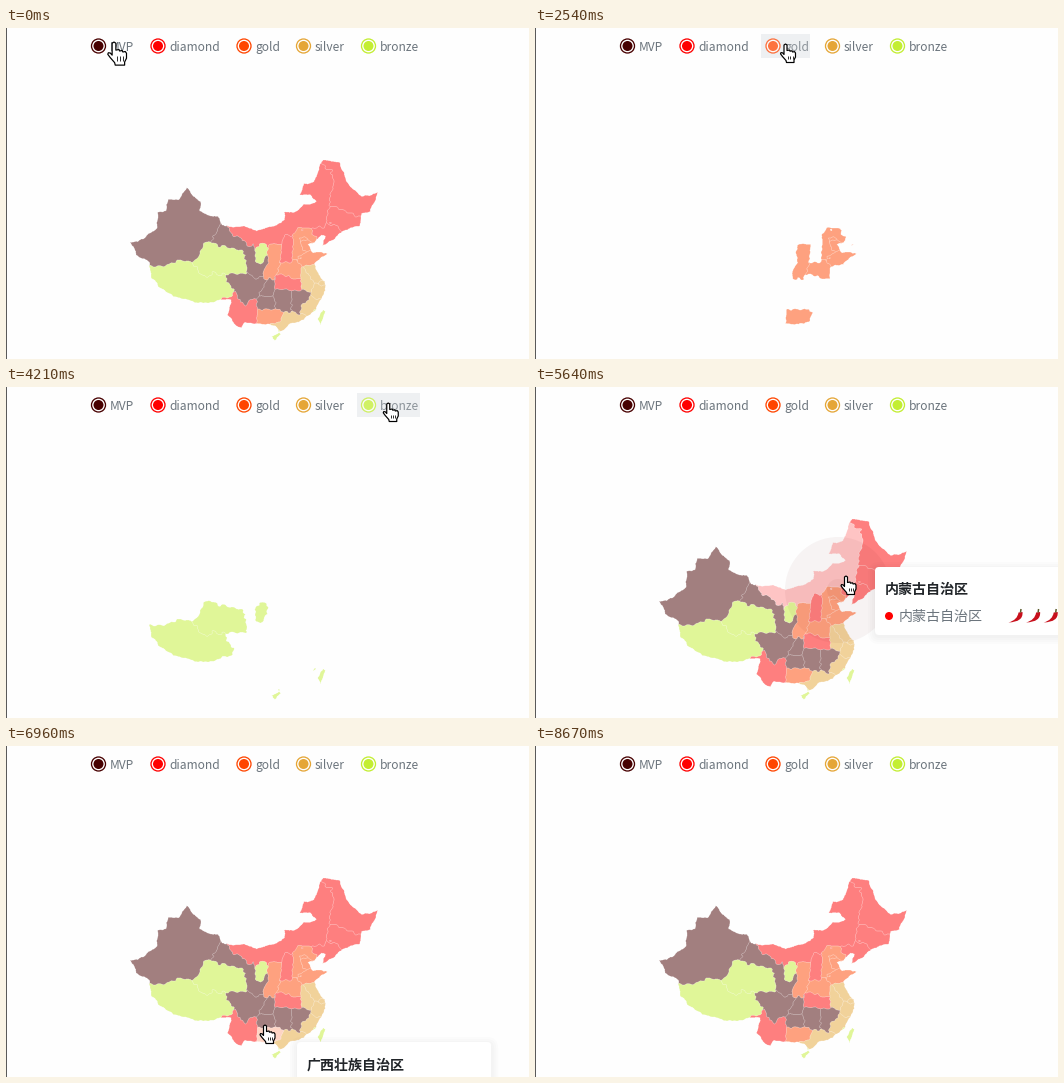
A matplotlib script for the animation above (9850 ms loop, 523 by 331 pixels).

```python
import numpy as np
import matplotlib.pyplot as plt
from matplotlib.animation import FuncAnimation
from matplotlib.patches import Circle, FancyBboxPatch, PathPatch, Polygon, Rectangle
from matplotlib.path import Path

W, H, STEP, LOOP = 523, 331, 50, 9850
FADE, LAG, SAMPLES = 250, 200, 3
plt.rcParams["font.family"] = ["Noto Sans CJK JP", "DejaVu Sans"]
BG = np.array([254, 254, 254]) / 255
GREY, INK = "#6c757d", "#212529"

# label, colour, icon x, right edge of the hover box, focus start and end
TIERS = [
    ("MVP", (71, 0, 0), 92.5, 131, 560, 1100),
    ("diamond", (255, 0, 0), 152, 216, 1150, 1910),
    ("gold", (255, 69, 0), 238, 275, 2240, 2910),
    ("silver", (229, 166, 55), 297.5, 341, 3020, 3740),
    ("bronze", (195, 238, 50), 362.5, 414, 3930, 4550),
]
COLORS = np.array([tier[1] for tier in TIERS]) / 255
MVP, DIAMOND, GOLD, SILVER, BRONZE = range(5)

rng = np.random.default_rng(4)
provinces = {}


def project(points):
    """Mercator projection of (lon, lat) to stage pixels."""
    lon, lat = np.array(points, float).T
    mercator = np.degrees(np.arctanh(np.sin(np.radians(lat))))
    return np.column_stack([124 + (lon - 73.5) * 4.026, 131 + (63.67 - mercator) * 4.026])


def coastline(*points):
    """Closed outline through key points, roughened by midpoint displacement."""
    pts = project(points)
    for _ in range(4):
        ahead = np.roll(pts, -1, axis=0)
        delta = ahead - pts
        normal = np.column_stack([-delta[:, 1], delta[:, 0]])
        middle = (pts + ahead) / 2 + normal * rng.uniform(-0.11, 0.11, (len(pts), 1))
        pts = np.stack([pts, middle], axis=1).reshape(-1, 2)
    return Path(pts)


def province(name, tier, *spine):
    """A province is all the land nearer to its spine than to any other."""
    provinces[name] = tier, project(spine)


LAND = [
    coastline((73.5, 39.4), (80.2, 42.1), (80.4, 45), (82.5, 45.3), (83, 47.2), (85.5, 47.1),
              (87.6, 49.1), (91, 46.8), (90.8, 45.2), (95.4, 44.2), (96.4, 42.7),
              (101.8, 42.5), (105, 41.6), (110, 42.7), (111.9, 43.7), (111.8, 45),
              (114, 44.9), (116.5, 46.3), (119.8, 46.8), (118.3, 48), (115.6, 47.9),
              (116.7, 49.8), (119.2, 50.1), (120.5, 52.4), (121.5, 53.4), (125.7, 53),
              (127.8, 49.7), (131, 47.7), (135, 48.4), (133.2, 45.1), (131.1, 44.8),
              (130.6, 42.5), (126.9, 41.7), (124.4, 40.1), (121.3, 38.8), (122, 40.6),
              (121, 40.8), (119.3, 39.4), (117.7, 39), (118.9, 37.4), (122.6, 37.3),
              (119.3, 35.2), (121.9, 31.5), (122, 29.6), (119.8, 25.6), (116.8, 23.2),
              (113.6, 22.3), (110.4, 20.3), (109.7, 21.6), (106.7, 22), (102, 22.5),
              (101.2, 21.3), (99.3, 22.2), (97.7, 24.2), (98.6, 27.6), (94, 27), (92, 26.9),
              (85.8, 28), (80.5, 30.4), (78.7, 32.4), (78.4, 35.4), (75, 37)),
    coastline((108.7, 19.3), (110.6, 20.1), (111, 19.7), (109.5, 18.2)),
    coastline((121.5, 25.3), (122, 25), (120.8, 21.9), (120.1, 23.2)),
]
province("新疆维吾尔自治区", MVP, (79.5, 37.3), (88.5, 38.2), (92.5, 41.6))
province("甘肃省", MVP, (96, 40.1), (98.8, 39.5), (103.2, 37.5), (104.2, 35), (104.9, 33.8),
         (107.3, 35.8))
province("四川省", MVP, (99.2, 31.4), (102.8, 31.8), (102.2, 27.6), (104.2, 29.4),
         (106.6, 31.4))
province("重庆市", MVP, (106.8, 29.4), (108.8, 31))
province("贵州省", MVP, (105.9, 26.6), (108.2, 26.8))
province("湖南省", MVP, (110.8, 28.3), (112.4, 28.3), (111.8, 26.4))
province("江西省", MVP, (116.6, 28.7), (115.1, 28.2), (115.2, 26))
province("内蒙古自治区", DIAMOND, (100.8, 41.4), (105, 39.6), (108.5, 39.9), (114.5, 42.8),
         (119.8, 43.4), (121.3, 47.2), (121.5, 51))
province("黑龙江省", DIAMOND, (124, 53), (127.3, 50), (125.3, 47.3), (131, 45.4))
province("吉林省", DIAMOND, (124.5, 44.2), (127, 43), (129.5, 42.8))
province("辽宁省", DIAMOND, (120.7, 41.2), (124.8, 41))
province("山西省", DIAMOND, (113, 39.4), (112.2, 36))
province("湖北省", DIAMOND, (110.2, 31), (114.7, 30.8))
province("云南省", DIAMOND, (99.8, 26.8), (100.3, 23), (103.4, 23.9), (103.7, 26.6))
province("河北省", GOLD, (115, 37.3), (115, 39.4), (115.6, 41), (118.2, 40.4))
province("北京市", GOLD, (116.4, 40.1))
province("天津市", GOLD, (117.3, 39.3))
province("山东省", GOLD, (116.4, 35.8), (118.5, 36.2), (121, 37))
province("河南省", GOLD, (111.8, 34.2), (114.5, 35), (114.4, 32.9))
province("陕西省", GOLD, (109.3, 38.1), (109, 34.5), (107.9, 33.5))
province("广西壮族自治区", GOLD, (106.9, 24), (109.9, 24.1))
province("江苏省", SILVER, (118.2, 34.1), (120.5, 31.9))
province("安徽省", SILVER, (116.8, 33), (117.6, 30.8))
province("上海市", SILVER, (121.6, 31.2))
province("浙江省", SILVER, (119.8, 28.8), (120.6, 30))
province("福建省", SILVER, (117.3, 25.3), (118.8, 26.9))
province("广东省", SILVER, (110.6, 21.4), (112.8, 23.5), (116, 23.6))
province("西藏自治区", BRONZE, (80.5, 31.8), (86, 33.4), (92, 31), (97.3, 30.6))
province("青海省", BRONZE, (92.3, 34.7), (92.8, 37.4), (100.8, 36.8), (100.3, 34.7),
         (96.5, 34.7))
province("宁夏回族自治区", BRONZE, (106.2, 38.3), (106, 36.4))
province("海南省", BRONZE, (109.8, 19.2))
province("台湾省", BRONZE, (121, 23.7))


def spine_distance(pts, spine):
    best = np.full(len(pts), np.inf)
    for a, b in zip(spine, np.vstack([spine[1:], spine[-1:]])):
        along = (pts - a) @ (b - a) / max((b - a) @ (b - a), 1e-9)
        foot = a + np.clip(along, 0, 1)[:, None] * (b - a)
        best = np.minimum(best, np.hypot(*(pts - foot).T))
    return best


def map_coverage(x0, y0, w, h):
    """Share of each stage pixel that belongs to each province, borders thinned."""
    gx, gy = np.meshgrid(x0 + (np.arange(w * SAMPLES) + 0.5) / SAMPLES,
                         y0 + (np.arange(h * SAMPLES) + 0.5) / SAMPLES)
    pts = np.column_stack([gx.ravel(), gy.ravel()])
    inside = np.any([land.contains_points(pts) for land in LAND], axis=0)
    pts = pts[inside]
    warped = pts.copy()
    for wavelength in (4, 6, 9, 13):
        for axis in (0, 1):
            angle, phase = rng.uniform(0, 2 * np.pi, 2)
            wave = pts @ (np.cos(angle), np.sin(angle)) * 2 * np.pi / wavelength
            warped[:, axis] += 0.09 * wavelength * np.sin(wave + phase)
    owner = np.full(gx.size, -1)
    owner[inside] = np.argmin([spine_distance(warped, s) for _, s in provinces.values()], axis=0)
    owner = owner.reshape(gx.shape)
    border = np.zeros(gx.shape, bool)
    for axis in (0, 1):
        for shift in (-1, 1):
            border |= owner != np.roll(owner, shift, axis)
    weight = 1 - 0.45 * border
    return np.array([((owner == k) * weight).reshape(h, SAMPLES, w, SAMPLES).mean((1, 3))
                     for k in range(len(provinces))])


MAP_BOX = 118, 126, 262, 194
coverage = map_coverage(*MAP_BOX)

HOVERS = [("黑龙江省", 5030), ("内蒙古自治区", 5400), ("青海省", 6200), ("四川省", 6560),
          ("广西壮族自治区", 6700), ("西藏自治区", 7100), ("新疆维吾尔自治区", 7400), (None, 8200)]
RIPPLES = [(5460, 303, 203), (7695, 172, 205)]
legend_stops = [(t, (x - 12 + right) / 2, 16) for _, _, x, right, start, end in TIERS
                for t in (start + FADE, end)]
CURSOR = np.array(legend_stops + [
    (4800, 360, 100), (5100, 340, 150), (5410, 318, 158), (5610, 311, 189), (6200, 240, 230),
    (6500, 225, 232), (6760, 269, 274), (6960, 259, 279), (7450, 180, 202), (7660, 154, 203),
    (7860, 183, 247), (8290, 235, 275), (8490, 247, 311), (8600, 250, 335)])
HAND = np.array([
    (4, 1), (5.5, 0), (7, 1), (7, 6.5), (9.5, 6), (10, 7.2), (12, 6.8), (12.6, 8),
    (14.5, 7.6), (15.5, 9), (15.5, 13), (14, 16), (14, 18.5), (6.5, 18.5), (6, 16.5),
    (2.5, 12.5), (0.5, 9.8), (1, 8.6), (2.5, 8.8), (4, 10.5)]) - (5.5, 0)
CHILLI = np.array([(14.5, 4), (15.5, 14), (0.5, 14.5), (9.5, 12), (10.5, 4.5), (14.5, 4)])
CHILLI_CODES = [Path.MOVETO] + [Path.CURVE3] * 4 + [Path.LINETO]

fig = plt.figure(figsize=(W / 72, H / 72), dpi=72, facecolor=BG)
ax = fig.add_axes([0, 0, 1, 1])
left, top, width, height = MAP_BOX
map_image = ax.imshow(np.ones((height, width, 3)), aspect="auto", interpolation="nearest",
                      extent=(left, left + width, top + height, top), zorder=1)
ax.set(xlim=(0, W), ylim=(H, 0))
ax.axis("off")
ax.add_patch(Rectangle((0, 0), 1, H, fc="#5a5a5a", lw=0))
legend = []
for (label, _, x, right, *_), color in zip(TIERS, COLORS):
    box = ax.add_patch(Rectangle((x - 12, 6), right - x + 12, 23.5, fc="#eef0f2", lw=0))
    ring = ax.add_patch(Circle((x, 18), 7, fc="white", ec=color, lw=1.3, zorder=2))
    dot = ax.add_patch(Circle((x, 18), 5, fc=color, lw=0, zorder=2))
    text = ax.text(x + 11.5, 23, label, size=12, color=GREY, zorder=2)
    legend.append((box, ring, dot, text))
overlay = []


def ramp(t, start, length):
    return float(np.clip((t - start) / length, 0, 1))


def pulse(t, start, end, fade):
    return ramp(t, start, fade) - ramp(t, end, fade)


def cursor_at(t):
    return tuple(np.interp(t, CURSOR[:, 0], CURSOR[:, i]) for i in (1, 2))


def put(patch, z):
    patch.set_zorder(z)
    overlay.append(ax.add_patch(patch))


def write(x, y, text, alpha, **style):
    overlay.append(ax.text(x, y, text, size=14, alpha=alpha, zorder=6, **style))


def rounded(x, y, w, h, radius, **style):
    return FancyBboxPatch((x, y), w, h, boxstyle=f"round,pad=0,rounding_size={radius}",
                          lw=0, **style)


def draw_tooltip(x, y, name, alpha):
    tier = provinces[name][0]
    chillies = max(4 - tier, 0)
    text_width = 14 * len(name)
    box_width = 61 + text_width + 17.6 * chillies
    for grow in range(1, 9, 2):
        put(rounded(x - grow, y - grow + 2, box_width + 2 * grow, 68 + 2 * grow, 4 + grow,
                    fc="black", alpha=0.01 * alpha), 5)
    put(rounded(x, y, box_width, 68, 4, fc="white", alpha=alpha), 5)
    write(x + 10, y + 27.3, name, alpha, color=INK, weight="bold")
    put(Circle((x + 14, y + 49), 4, fc=COLORS[tier], lw=0, alpha=alpha), 6)
    write(x + 24, y + 54.3, name, alpha, color=GREY)
    for i in range(chillies):
        corner = np.array([x + 49 + text_width + 17.6 * i, y + 41])
        put(PathPatch(Path(CHILLI + corner, CHILLI_CODES), fc="#c8101c", lw=0, alpha=alpha), 6)
        put(Polygon([corner + (12.5, 4.5), corner + (13, 1)], closed=False, fill=False,
                    ec="#5a5a2a", lw=1.5, alpha=alpha), 6)


def draw_cursor(x, y, scale=1.0):
    put(Polygon(HAND * scale + (x, y), fc="white", ec="black", lw=1.2, joinstyle="round"), 8)
    for dx in (2.5, 4.8, 7):
        line = np.array([(dx, 11.5), (dx, 15)]) * scale + (x, y)
        put(Polygon(line, closed=False, fill=False, ec="black", lw=0.8), 9)


def draw(frame):
    t = frame * STEP + 10
    while overlay:
        overlay.pop().remove()

    focus = np.array([pulse(t, start, end, FADE) for *_, start, end in TIERS])
    opacity = np.clip(1 - (focus.sum() - focus), 0, 1)
    hover = dict.fromkeys(provinces, 0.0)
    current = None
    for (name, start), (_, end) in zip(HOVERS, HOVERS[1:]):
        hover[name] += pulse(t, start, end, 120)
        if t >= start:
            current = name
    tints = [(COLORS[tier] - BG) * 0.5 * opacity[tier] * (1 - 0.55 * hover[name])
             for name, (tier, _) in provinces.items()]
    map_image.set_data(np.clip(BG + np.tensordot(coverage, tints, (0, 0)), 0, 1))

    x, y = cursor_at(t)
    for (_, _, icon_x, right, *_), (box, *parts) in zip(TIERS, legend):
        active = t > 600 and icon_x - 12 <= x <= right and y < 30
        box.set_visible(active)
        for part in parts:
            part.set_alpha(0.75 if active else 1)

    for start, cx, cy in RIPPLES:
        age = t - start
        if 0 <= age < 450:
            for radius in (20 + 0.22 * age, 11):
                put(Circle((cx, cy), radius, fc="#640a00", lw=0,
                           alpha=0.045 * (1 - ramp(age, 200, FADE))), 3)

    alpha = pulse(t, 5030, 8400, FADE)
    if current and alpha > 0:
        lag_x, lag_y = cursor_at(t - LAG)
        draw_tooltip(lag_x + 22, lag_y + 22, current, alpha)

    if t < 90:
        draw_cursor(108, 14, 1.25)
    elif 630 <= t < 8600:
        draw_cursor(x, y)
    return []


animation = FuncAnimation(fig, draw, frames=LOOP // STEP, init_func=lambda: [],
                          interval=STEP, repeat=True, repeat_delay=0,
                          cache_frame_data=False)
plt.show()
```
